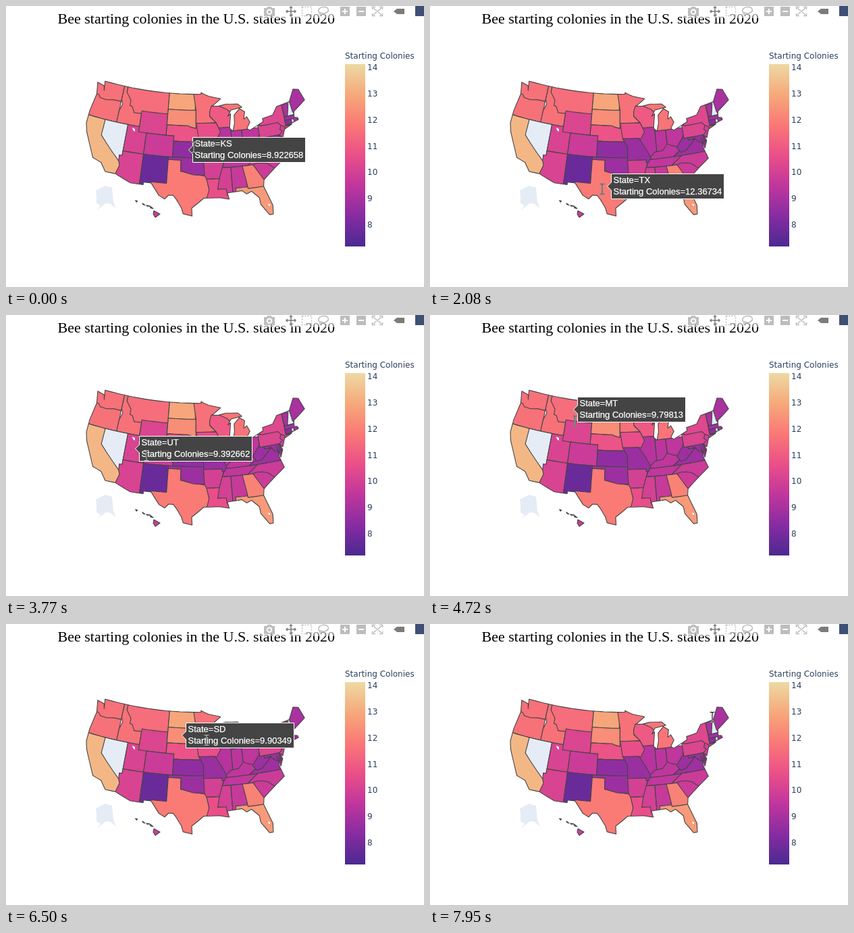
Recreate the animation shown at these times as an HTML page. Size 619 px wide and 416 px high, loop 8000 ms.

```html
<!DOCTYPE html>
<html lang="en">
<head>
<meta charset="utf-8">
<title>Bee colonies map</title>
<style>
  html, body { margin: 0; width: 100%; height: 100%; overflow: hidden; background: #fff; }
  svg { display: block; isolation: isolate; }
  .title { font: 22px "Liberation Serif", "Times New Roman", serif; fill: #000; }
  .scale { font: 12px "DejaVu Sans", Verdana, sans-serif; fill: #2a3f5f; }
  .tip text { font: 13px "Liberation Sans", Arial, sans-serif; fill: #fff; stroke: #fff; stroke-width: .25; }
  .tip path { fill: #444; stroke: #fff; }
  .line { stroke: #444; stroke-width: 1.1; stroke-linejoin: round; }
  .cursor { fill: none; stroke: #fff; stroke-width: 1.1; mix-blend-mode: difference; }
</style>
</head>
<body>
<svg width="619" height="416" viewBox="0 0 619 416">
  <defs>
    <clipPath id="clip"><path id="land"/></clipPath>
    <linearGradient id="sunset" x1="0" y1="1" x2="0" y2="0"></linearGradient>
  </defs>
  <rect width="619" height="416" fill="#fff"/>

  <path fill="#e5ecf6" d="M134 282L133 273L147 266L157 269L159 290L163 300L155 293L148 292L134 303L140 296L134 292Z"/>
  <g id="states" clip-path="url(#clip)"></g>
  <path id="coast" class="line" fill="none"/>
  <path fill="#fff" d="M187 180l4 2v4l-3-2zM388 293h3v3h-2z"/>
  <path class="line" fill="#c93e98" d="M191.500 288l3 .5-1 2zM202 292l4 3-3-1zM208 295l5 1-4 .5zM213 296l5 4-4-1zM219 303l9 5-7 5-3-5z"/>

  <text class="title" x="76.500" y="26">Bee starting colonies in the U.S. states in 2020</text>
  <rect x="376" width="243" height="18" fill="#fff" opacity=".5"/>
  <g fill="#444" fill-opacity=".35" stroke="#444" stroke-opacity=".35">
    <path stroke="none" fill-rule="evenodd" d="M382 3h4l1.500-2h5l1.500 2h4v12h-16zM390 4.500a4.200 4.200 0 1 0 .1 0zM390 6.500a2.300 2.300 0 1 1-.1 0z"/>
    <rect x="438.500" y="1.500" width="14" height="13" fill="none" stroke-width="1.500" stroke-dasharray="2 2"/>
    <path fill="none" stroke-width="1.600" d="M466 11C461 9 462 2 470 1.500S480 8 473 10.500Q469 12 466 10Q463 12 467 15"/>
    <path stroke="none" fill-rule="evenodd" d="M495 1h14v14h-14zM501 4v3h-3v2h3v3h2v-3h3v-2h-3v-3zM519 1h14v14h-14zM522 7v2h8v-2z"/>
    <path fill="none" stroke-width="1.600" d="M542.500 5V1.500H547M553 1.500h4.500V5M557.500 11v3.500H553M547 14.500h-4.500V11M544 3l12 10M556 3L544 13"/>
  </g>
  <g fill="#7c7c7c" stroke="#7c7c7c">
    <path fill="none" stroke-width="1.500" d="M422 1v14M415 8h14M420 3l2-2 2 2M420 13l2 2 2-2M417 6l-2 2 2 2M427 6l2 2-2 2"/>
    <path stroke="none" d="M574 8l5-4h11v8h-11z"/>
  </g>
  <rect x="606" width="13" height="15" fill="#3f4f75"/>

  <g id="scale" class="scale">
    <text x="502" y="78">Starting Colonies</text>
    <rect x="502" y="86" width="30" height="270" fill="url(#sunset)"/>
  </g>

  <g id="tip" class="tip"><path/><text x="9" y="-5"></text><text x="9" y="12"></text></g>
  <path id="cursor" class="cursor" d="M-3.500-7.500h2.500l1 1 1-1h2.500M0-6.500v13M-3.500 7.500h2.500l1-1 1 1h2.500"/>
</svg>
<script>
const byId = id => document.getElementById(id);
const add = (parent, tag, attrs, text = "") => {
  const el = document.createElementNS("http://www.w3.org/2000/svg", tag);
  for (const key in attrs) el.setAttribute(key, attrs[key]);
  el.textContent = text;
  parent.append(el);
};

// Colour scale
const ramp = [[75, 41, 145], [135, 44, 162], [192, 54, 157], [234, 79, 136], [250, 120, 118], [246, 169, 122], [237, 217, 163]];
const low = 7.15, high = 14.13, noData = "#e5ecf6";
function colorOf(value) {
  if (value === null) return noData;
  const at = (value - low) / (high - low) * (ramp.length - 1), i = Math.floor(at);
  return `rgb(${ramp[i].map((c, k) => Math.round(c + (ramp[i + 1][k] - c) * (at - i)))})`;
}
ramp.forEach((rgb, i) => add(byId("sunset"), "stop", { offset: i / (ramp.length - 1), "stop-color": `rgb(${rgb})` }));
for (let v = 8; v <= 14; v++) add(byId("scale"), "text", { x: 535, y: 95.4 + (14 - v) * 38.75 }, v);

// Albers equal-area conic projection, degrees west and north to stage pixels
const rad = Math.PI / 180;
const s1 = Math.sin(29.5 * rad), s2 = Math.sin(45.5 * rad);
const cone = (s1 + s2) / 2, base = 1 - s1 * s1 + 2 * cone * s1;
function project(west, north) {
  const rho = 448 * Math.sqrt(base - 2 * cone * Math.sin(north * rad)) / cone;
  const angle = cone * (96 - west) * rad;
  return (284.1 + rho * Math.sin(angle)).toFixed(1) + " " + (rho * Math.cos(angle) - 363).toFixed(1);
}

// Closed path; two points are opposite corners. Long edges are subdivided so that parallels bend.
function outline(text) {
  let pts = text.split(" ").map(p => p.split(",").map(Number));
  if (pts.length === 2) {
    const [[w, n], [e, s]] = pts;
    pts = [[w, n], [e, n], [e, s], [w, s]];
  }
  const out = [];
  pts.forEach(([w, n], i) => {
    const [w2, n2] = pts[(i + 1) % pts.length];
    const parts = Math.max(1, Math.ceil(Math.abs(w2 - w) / 2));
    for (let k = 0; k < parts; k++) out.push(project(w + (w2 - w) * k / parts, n + (n2 - n) * k / parts));
  });
  return "M" + out.join("L") + "Z";
}

const pacific = "122.8,49 122.3,47.2 122.7,48.1 124.7,48.4 124,46.2 124.5,42.8 124.4,40.4 123.7,38.9 122.4,37.1 120.6,34.5 118.5,34 117.1,32.5";
const south = "114.8,32.5 111.1,31.3 108.2,31.3 108.2,31.8 106.5,31.8 104.5,29.6 103.2,29 102.4,29.8 101.4,29.8 100.7,29.1 99.5,27.5 99.1,26.4 97.2,26 97.3,27.5 94.7,29.4 91.3,29.4 89.2,29 89.5,30.2 86.3,30.4 85.3,29.7 84.2,30.1 82.7,28.7 82.6,27.4 81.1,25.2 80.3,25.2 80.1,26.9 81.4,30.7 81.1,31.9";
const atlantic = "79.3,33.1 78,33.9 75.6,35.2 76.2,37 76.4,39.3 75.9,37.2 75.1,38.5 75.5,39.5 74.9,39 74,40.5 71.9,41.1 73.6,41 70,41.6 70.1,42 70.9,42.2 70.6,43.3 67,44.8 67.8,47.1 69.2,47.4 71.1,45.3 74.7,45 76.2,43.6 79,43.3 79,42.7";
const lakes = "82.7,41.5 83.4,41.9 82.4,43 83,44.1 83.9,43.7 83.4,45.1 84.7,45.8 86.3,44.7 86.4,43.2 87,41.7 87.8,42.3 87.2,45 88,44.6 87,45.7 84,46 85,46.7 88.3,46.9 90.4,46.6 92,46.7 89.6,48 93,48.6 95.1,49.3 95.1,49";
const land = outline([pacific, south, atlantic, lakes].join(" "));
byId("land").setAttribute("d", land);
byId("coast").setAttribute("d", land);

// Rough shapes clipped to the land; later states trim earlier ones
const states = {
  MT: [11.5, "116.05,49.1 104.05,44.4"],
  OR: [11.6, "125,46.5 117.03,42"],
  WA: [11.6, "125,49.1 117.03,49.1 117.03,46 119,46 121,45.65 122.8,45.7 123.4,46.2 125,46.3"],
  ID: [11.6, "117.03,49.1 116.05,49.1 116.05,48 114.5,46.6 114.5,45.6 113.8,45.5 113,44.4 111.05,44.5 111.05,42 117.03,42 117.03,44.2 116.5,45.6 117.03,46.4"],
  CA: [13.3, "125,42 114,32"],
  NV: [null, "120,42 114.04,42 114.04,36 114.6,35 120,39"],
  AZ: [10.15, "114.04,37 109.05,37 109.05,31 115,31 114.7,32.7 114.2,34.2 114.6,35 114.7,36.1 114.04,36.1"],
  UT: [10.15, "114.04,42 109.05,37"],
  NE: [10.75, "104.05,43 95,40"],
  WY: [10.2, "111.05,45 104.05,41"],
  CO: [9.75, "109.05,41 102.05,37"],
  NM: [7.75, "109.05,37 103.04,31"],
  TX: [11.85, "103.04,36.5 100,36.5 100,34.4 94.04,33.5 93.5,31 93.8,25 107,25 106.6,32 103.04,32"],
  SD: [12.3, "104.05,45.95 96.5,45.95 96.5,42.5 98,42.8 98.5,43 104.05,43"],
  ND: [12.9, "104.05,49.1 96.7,45.95"],
  KS: [8.5, "102.05,40 94.62,37"],
  OK: [8.75, "103,37 94.62,37 94.45,33.7 97,33.8 100,34.5 100,36.5 103,36.5"],
  MN: [11.6, "97.2,49.1 95,49.5 89,48.2 92,46.7 92.8,45.6 92.8,44.7 91.2,43.5 96.5,43.5 96.5,46"],
  MI: [11.7, "90.4,47.5 82,41.72"],
  WI: [10.95, "92.3,46.7 90.4,46.7 88.1,45.9 87,45 87,42.5 90.6,42.5 91.2,43.5 92.8,44.8 92.8,45.6"],
  IL: [9.3, "91.5,42.5 87.52,36.9"],
  IN: [9.4, "87.52,41.76 84.8,37.5"],
  OH: [9.45, "84.8,41.75 80.52,38"],
  KY: [9.45, "89.5,36.5 89.1,37 88,37.8 86,38 84.8,39.1 83.6,38.65 82.6,38.4 82,37.5 83.7,36.6"],
  TN: [9.5, "90.3,35 89.5,36.5 81.7,36.6 84.3,35"],
  MS: [10, "91.6,35 88.3,30"],
  AL: [9.65, "88.3,35 85,30"],
  LA: [10.6, "94.04,33 91.1,33 91.6,31 89.7,31 89.6,30 88.5,28 94.5,28 93.5,31"],
  AR: [10, "94.62,36.5 89.7,36.5 91.1,33 94.04,33 94.45,33.6"],
  IA: [10.6, "96.4,43.5 91.2,43.5 90.2,41.8 91.2,40.5 95.8,40.6"],
  MO: [8.7, "95.8,40.6 91.7,40.6 90.2,38.7 89.1,36.9 89.6,36 90.3,36 90.2,36.5 94.62,36.5 94.62,39.1"],
  MD: [8.75, "79.48,39.72 75,38"],
  DE: [8.75, "75.79,39.8 75,38.45"],
  VA: [8.8, "83.7,36.6 82,37.5 79,38.5 78,39.4 77,38.5 75,38 75,36.6"],
  NC: [9.75, "84.3,35 81.7,36.6 75,36.6 75,33 83,33 83.1,35"],
  FL: [12.6, "87.6,31 79,24"],
  GA: [12.05, "85.6,35 83.1,35 80.5,31.5 81.3,30.7 84.9,30.7 85.1,32.3"],
  SC: [9.75, "83.1,35 82.3,35.2 81,35.1 79.7,34.8 78,33.5 80.5,31.5 81.3,32.2"],
  WV: [8.75, "82.6,38.2 81.8,39 80.7,40 80.52,40.6 80.52,39.72 79.48,39.72 79.48,39.2 77.8,39.3 80.3,37.5 81.7,37.2"],
  NY: [10.3, "80,45.1 73.35,45.1 73.5,41.1 71.5,41.2 72,40.4 74,40.5 75,41.5 80,41.5"],
  NJ: [9.9, "75.5,41 74.7,41.35 73.9,41 73.5,38.5 75.5,38.5"],
  PA: [10.2, "80.52,42.3 79.76,42 75.35,42 74.7,41.35 75.2,40.7 74.7,40.2 75.5,39.72 80.52,39.72"],
  NH: [null, "72.5,45.3 70.7,42.73"],
  VT: [9, "73.35,45.1 71.5,45.1 72.5,42.73 73.3,42.73"],
  ME: [9, "71.08,45.4 70.97,43.3 70.7,43 66,43 66,48 70.5,48"],
  MA: [8.85, "73.4,42.73 69.5,41.2"],
  CT: [8.45, "73.5,42.04 71.8,41.15"],
  RI: [null, "71.8,42 71.2,41.2"]
};
for (const [value, shape] of Object.values(states))
  add(byId("states"), "path", { class: "line", fill: colorOf(value), d: outline(shape) });

// Hover labels: start time, state, value, arrow tip
const hovers = [
  [0, "KS", "8.922658", 270.5, 213], [1150, "TX", "12.36734", 262.5, 267],
  [2350, "NM", "8.029433", 220.5, 242], [3770, "UT", "9.392662", 191.5, 198],
  [4720, "MT", "9.79813", 212.5, 140], [5800, "ND", "13.08154", 260.5, 142],
  [6500, "SD", "9.90349", 260.5, 165], [6620, "IA", "10.3735", 299.5, 185],
  [6770, "IL", "9.26813", 324.5, 199], [7010, "IN", "9.21034", 341.5, 198],
  [7250, "OH", "9.6803", 361.5, 193], [7400, "NY", "8.294050", 399.5, 165], [7950, ""]
];

// Cursor moves: start time, number of ticks, destination
const tick = 130;
const moves = [
  [0, 1, 278, 209], [1000, 3, 258, 272], [2080, 1, 255, 271], [2200, 3, 222, 244],
  [3620, 2, 208, 208], [3890, 1, 209, 201], [4570, 2, 214.5, 157], [5530, 4, 264, 152],
  [6350, 1, 266, 156], [6480, 1, 297, 172], [6610, 4, 345, 188], [7130, 5, 408, 158],
  [7950, 1, 418, 138]
];
function cursorAt(time) {
  let x = 0, y = 0;
  for (const [start, ticks, toX, toY] of moves) {
    if (time < start) break;
    const part = Math.min(1, (Math.floor((time - start) / tick) + 1) / ticks);
    x += (toX - x) * part;
    y += (toY - y) * part;
  }
  return [x, y];
}

const tip = byId("tip");
const [frame, nameLine, valueLine] = tip.children;
function showLabel([, name, value, x, y]) {
  tip.style.visibility = name ? "visible" : "hidden";
  if (!name) return;
  nameLine.textContent = "State=" + name;
  valueLine.textContent = "Starting Colonies=" + value;
  const right = Math.round(valueLine.getComputedTextLength()) + 12;
  frame.setAttribute("d", `M0 0L6 6V18.5H${right}V-18.5H6V-6Z`);
  tip.setAttribute("transform", `translate(${x} ${y})`);
}

let shown;
function draw() {
  const time = performance.now() % 8000;
  const hover = hovers.findLast(([start]) => start <= time);
  if (hover !== shown) showLabel(shown = hover);
  byId("cursor").setAttribute("transform", `translate(${cursorAt(time)})`);
  requestAnimationFrame(draw);
}
draw();
</script>
</body>
</html>
```
